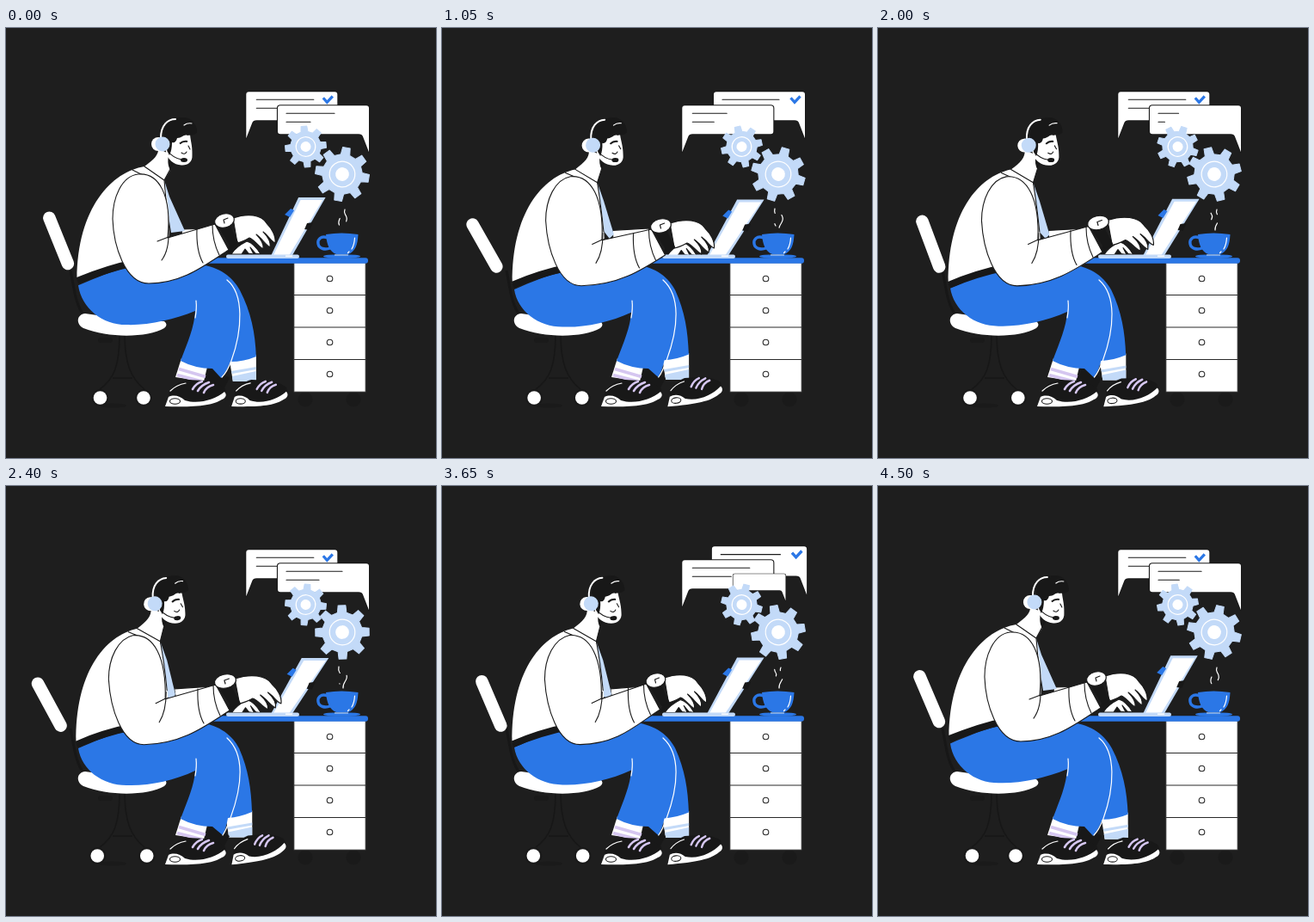
An HTML page for the animation above (4.55 s loop, 500 px wide and 500 px high).

```html
<!DOCTYPE html>
<html lang="en">
<head>
<meta charset="utf-8">
<title>Busy desk</title>
<style>
html, body { margin: 0; width: 100%; height: 100%; overflow: hidden; background: #1e1e1e; }
svg { display: block; width: 100vw; height: 100vh; }
.w { fill: #fff; }
.b { fill: #2b77e6; }
.l { fill: #c3daf8; }
.k { fill: #181818; }
.d { fill: #1a1a1a; }
.o { stroke: #1a1a1a; stroke-width: 1.1; stroke-linejoin: round; stroke-linecap: round; }
.n { fill: none; }
.out { paint-order: stroke; stroke-width: 2.2; }
.ws { fill: none; stroke: #fff; stroke-width: 1.2; stroke-linecap: round; }
.ds { fill: none; stroke: #171717; stroke-width: 1.6; }
</style>
</head>
<body>
<svg viewBox="0 0 500 500">
  <defs>
    <g id="shoe">
      <path class="k" d="M189,426 C193,415 202,411 210,409 L232,410 C238,411 247,413 254,418 Q257,424 253,428 L230,437 L204,436Z"/>
      <path class="w" d="M185,440 L189,429 C195,426 203,428 208,433 C224,438 243,432 254,423 C257,426 256,430 251,432 C240,439 222,441 185,440Z"/>
      <ellipse class="o n" cx="196.500" cy="434" rx="6" ry="3.200"/>
      <path class="ws" d="M191,422 Q198,415 209,413"/>
      <path d="M217,420 Q221,413 228,411 M223,422 Q227,415 236,412 M230,424 Q233,417 241,415" fill="none" stroke="#d5c6f0" stroke-width="2.600" stroke-linecap="round"/>
    </g>
  </defs>

  <g id="cards"></g>
  <g id="gearS"></g>
  <g id="gearL"></g>

  <!-- desk -->
  <circle class="d" cx="348" cy="432" r="8.500"/>
  <circle class="d" cx="404" cy="432" r="8.500"/>
  <rect class="w" x="335" y="273" width="83" height="150" stroke="#555" stroke-width=".8"/>
  <g id="drawers" fill="none" stroke="#2a2a2a" stroke-width="1.100"></g>
  <rect class="b" x="232" y="267.300" width="189" height="6.400" rx="3"/>

  <!-- cup -->
  <ellipse class="b" cx="390.500" cy="265.500" rx="21.500" ry="2.300"/>
  <path d="M374,244 C366,241 362,246 363,251 C364,257 371,258 377,256" fill="none" stroke="#2b77e6" stroke-width="3.400"/>
  <path class="b" d="M372,240 Q390,237 409.500,240 C409,252 406,260 398,263 H384 C376,260 373,252 372,240Z"/>
  <path class="ws" d="M405.500,244 Q405,252 402,257 M399,260 L397.500,261.500"/>
  <path d="M382,264 H398" stroke="#c3daf8" stroke-width="1.100"/>
  <path class="ws" id="steamL" d="M388,230 C384,224 391,221 388,217 Q386,214 387,210"/>
  <path class="ws" id="steamR" d="M392,235 C391,228 398,226 396,220 C395,216 392,216 394,211"/>

  <!-- laptop -->
  <path class="l" id="lid"/>
  <path class="w" id="screen"/>
  <g id="stickers">
    <path class="b" d="M324,217 L331,210 L335,212 L330,220Z"/>
    <path class="k" d="M347,234 L350,227 L357,226 L353,235Z"/>
  </g>

  <!-- chair -->
  <g class="ds">
    <path d="M75,282 C79,300 80,322 92,336" stroke-width="3"/>
    <path d="M132,356 C132,392 126,408 109,420 M138,356 C138,392 146,408 161,420 M124,407 H147"/>
  </g>
  <rect class="d" x="107" y="360" width="17" height="6" rx="3"/>
  <ellipse class="d" cx="124" cy="439" rx="16" ry="2.500"/>
  <g id="casters"></g>
  <path id="back" stroke="#fff" stroke-width="14.500" stroke-linecap="round"/>
  <path class="w" d="M92,332 C120,336 150,341 184,341 Q189,345 184,349 C165,360 120,361 90,349 C81,344 82,333 92,332Z"/>

  <!-- legs -->
  <g id="sockFar">
    <path class="w" d="M260,386 L291,380 L291,411 L264,411Z"/>
    <path class="l" d="M262,399 L291,394 V397 L263,402Z M263,405 L291,399 V411 H264Z"/>
  </g>
  <use href="#shoe" id="shoeFar"/>
  <path class="k" d="M230,410 L234,398 L240,394 C247,400 255,404 260,407 L253,420Z"/>
  <path class="w" d="M204,384 L234,394 L230,411 L197,406Z"/>
  <path d="M201,396.500 L232,405.500 M199,403.500 L228,411" fill="none" stroke="#d5c6f0" stroke-width="3.600"/>
  <use href="#shoe"/>
  <path class="b" id="pants"/>
  <path class="ws" id="seam"/>
  <path class="ws" d="M221,317 Q222,326 220,337"/>

  <!-- far arm -->
  <path class="w o" id="sleeveFar"/>
  <g id="handFar">
    <path class="k" d="M256,262 L262,248 L286,250 L297,263Z"/>
    <path class="w o" d="M262,263 C266,256 274,251 280,248 C287,250 292,256 296,263 L290,262 L284,255 L288,263 L282,262 L278,257 L274,263Z"/>
  </g>
  <rect class="l" x="256" y="263.500" width="85" height="4.500" rx="2.200"/>
  <rect class="w" x="325" y="264.500" width="8" height="1.500"/>

  <!-- torso -->
  <path class="l" id="tie"/>
  <path class="w" id="torso"/>
  <path id="belt" fill="none" stroke="#181818" stroke-width="8"/>
  <path class="w" id="neck"/>
  <path class="k" id="shade"/>
  <path class="o n" id="collar"/>

  <g id="head">
    <path class="w" d="M184,124 L214,122 C214,130 217,136 216.500,148 C217,156 211,160 204,159.500 C195,159 188,153 186,144Z"/>
    <path class="k" d="M184,128 C181,112 194,103 206,104 C215,103 223,112 222,122 C218,126 213,124 211,125 C207,123 205,128 199,128 C198,132 196,134 193,133 C193,139 192,144 190,148 C187,143 185,136 184,128Z"/>
    <path d="M202,134.500 Q206,131 211,132" fill="none" stroke="#1a1a1a" stroke-width="2"/>
    <path class="o n" d="M204,145 Q208,148 210,144 M212,137 L214,141"/>
    <path class="ws" d="M207,113 Q211,110 216,111"/>
    <path class="ws" d="M180,128 C180,113 188,106 197,106" style="stroke-width:2"/>
    <circle class="w" cx="177" cy="135" r="8"/>
    <circle class="l" cx="182" cy="135" r="8.500"/>
    <path class="o n" d="M188,143 Q194,151 204,153"/>
    <ellipse class="k" cx="207" cy="153.500" rx="4" ry="2.500"/>
  </g>

  <!-- near arm -->
  <path class="w o" id="arm"/>
  <path class="o n" id="crease"/>
  <g id="hand">
    <path class="w o" d="M264,221 C281,215 297,217 303,227 C309,233 314,242 313,250 C308,248 305,241 299,237 C305,243 308,250 307,255 C301,251 297,244 291,240 C297,246 300,252 299,257 C292,253 289,246 283,244 C278,247 274,249 269,250Z"/>
    <path class="k" d="M248,233 L260,229 L270,249 L261,254Z"/>
    <ellipse class="w o" cx="254" cy="224" rx="11.500" ry="8" transform="rotate(-14 254 224)"/>
    <path class="o n" d="M258,221 L253,223 L254,227"/>
  </g>
</svg>

<script>
const LOOP = 4550, CHAT = LOOP / 2, SWAY = LOOP / 3;
const $ = id => document.getElementById(id);
const put = (id, name, value) => $(id).setAttribute(name, value);

// blend the numbers of two paths of equal structure
function mix(a, b, k) {
  const to = b.match(/-?[\d.]+/g);
  let i = 0;
  return a.replace(/-?[\d.]+/g, n => (+n + (to[i++] - n) * k).toFixed(2));
}

// piecewise interpolation through [time, value, time, value, ...]
function keys(t, list, soft) {
  const n = list.length;
  if (t <= list[0]) return list[1];
  for (let i = 2; i < n; i += 2) {
    if (t <= list[i]) {
      let k = (t - list[i - 2]) / (list[i] - list[i - 2]);
      if (soft) k = (1 - Math.cos(Math.PI * k)) / 2;
      return list[i - 1] + (list[i + 1] - list[i - 1]) * k;
    }
  }
  return list[n - 1];
}

function gear(r) {
  const pts = [];
  for (let i = 0; i < 8; i++) {
    for (const [a, q] of [[-13, .74], [-8, 1], [8, 1], [13, .74]]) {
      const w = (i * 45 + a - 90) * Math.PI / 180;
      pts.push((Math.cos(w) * r * q).toFixed(2) + ',' + (Math.sin(w) * r * q).toFixed(2));
    }
  }
  return `<polygon class="l" points="${pts.join(' ')}" stroke="#c3daf8" stroke-linejoin="round"/>
    <circle class="ws" r="${r * .47}"/><circle class="w" r="${r * .25}"/>`;
}

$('gearL').innerHTML = gear(31.5);
$('gearS').innerHTML = gear(24);
$('drawers').innerHTML = [0, 1, 2, 3].map(i => {
  const y = 273 + i * 37.5;
  return (i ? `<path d="M335,${y} H418"/>` : '') +
    `<circle cx="376.500" cy="${291.5 + i * 37}" r="3.300"/>`;
}).join('');

function card(left, y, size, line1, line2, tick) {
  if (size <= 0) return '';
  const x = left ? -41 : -43;
  return `<g transform="translate(${left ? 332.3 : 369} ${y}) scale(${size})">
    <path class="w o out" transform="scale(${left ? 1 : -1} 1)" d="M-50,0 H50 Q53,0 53,3 V30 Q53,33 50,33 H-41 Q-45,33 -46,36 L-53,54 V3 Q-53,0 -50,0Z"/>
    <path class="o n" d="${line1 > 0 ? `M${x},9 h${line1}` : ''}${line2 > 0 ? `M${x},19 h${line2}` : ''}"/>
    ${tick > 0 ? `<path d="M-5.500,-2 L-1,3 L5.500,-4" transform="translate(42 9) scale(${tick})" fill="none" stroke="#2b77e6" stroke-width="3.200"/>` : ''}
  </g>`;
}

function drawCards(t) {
  const c = t % CHAT, left = c < 1200, u = left ? c : c - 1100;
  const up = 16 * keys(u, [125, 0, 275, .25, 500, .63, 625, .94, 700, 1]);
  const die = keys(u, [200, 1, 275, 1.04, 400, 1.05, 500, .925, 625, .29, 680, 0]);
  const pop = left ? keys(c, [380, 0, 500, .8, 625, 1.075, 750, 1])
                   : keys(c, [1290, 0, 1375, .575, 1500, 1.05, 1600, 1.1, 1750, 1]);
  const tick = keys(u, [350, 0, 500, .75, 600, 1]);
  const v = left ? c + CHAT : c;
  const typed = {
    true: [keys(c, [750, 0, 1250, 66.5]), keys(c, [800, 0, 1250, 45])],
    false: [keys(v, [1800, 0, 2275, 56, 2400, 65, 2430, 66]),
            keys(v, [1900, 0, 2275, 28, 2400, 38, 2480, 44])]
  };
  $('cards').innerHTML =
    card(left, 74.3 - up, die, 66.5, 45, 1) +
    card(!left, 90.3 - up, 1, ...typed[!left], tick) +
    card(left, 106.3 - up, pop, ...typed[left], 0);
}

function drawBody(t) {
  const ph = t / SWAY % 1, turn = 2 * Math.PI;
  const p = (1 - Math.cos(turn * ph)) / 2;
  const q = (1 - Math.cos(turn * (ph - .05))) / 2;
  const c = Math.cos(turn * (ph - .17));
  const wx = keys(t, [0, 254, 500, 252, 1600, 257, 2400, 255, 2900, 252, 3650, 248.5, 4500, 254], true);
  const wy = keys(t, [0, 224, 500, 234, 1600, 226, 2400, 227, 2900, 227, 3650, 226, 4500, 224], true);
  const reach = keys(t, [0, 0, 500, .2, 1600, .8, 2400, 1, 2900, 0], true);
  const morph = (id, a, b, k = p) => put(id, 'd', mix(a, b, k));

  // chair
  put('back', 'd', `M${45.5 + 10 * c},${221 + 6 * p - 2.5 * (c - .4)} L${69.5 + 5 * c - 1.8 * p},${274 + 5 * p}`);
  $('casters').innerHTML = [109.5 - 3.5 * p, 160 + 4 * p].map(x =>
    `<circle class="d" cx="${x}" cy="430" r="10"/><circle class="w" cx="${x}" cy="430" r="7.800"/>`).join('');

  // legs
  put('shoeFar', 'transform', `rotate(${-7.5 * q} 264 438) translate(91 0) scale(.925 1)`);
  put('sockFar', 'transform', `translate(${-4.8 * q} ${-2.5 * q})`);
  morph('pants',
    'M84,299 C105,290 125,282 142,278 L225,275 C249,278 264,290 272,305 C285,330 290,355 291,382 Q277,388 261,388 Q257,399 250,407 L240,396 Q220,396 203,387 C211,366 219,348 220,329 C195,339 165,346 140,345 C112,345 88,326 84,299Z',
    'M84,305 C105,296 120,289 142,285 L225,275 C249,278 264,291 271,305 C282,330 285,352 286,379 Q272,385 258,386 Q256,398 252,406 L240,396 Q220,396 203,387 C211,366 219,348 220,331 C195,343 165,349 140,348 C112,348 88,330 84,305Z', q);
  morph('seam', 'M257,293 C277,309 275,351 262,387 Q257,400 251,406',
    'M257,293 C278,312 275,348 261,386 Q256,400 252,406', q);

  // laptop lid
  const sx = 3.8 * q, sy = 3 * q;
  put('lid', 'd', `M308,265 L${340 + sx},${197 + sy} H${371.5 + sx} L332,266Z`);
  put('screen', 'd', `M311,264 L${342.5 + sx},${200 + sy} H${368 + sx} L329.5,264Z`);
  put('stickers', 'transform', `translate(${sx * .7} ${sy * .6})`);

  // torso
  morph('torso',
    'M161,161 C123,167 83,209 82.500,292 Q110,280 150,272 L190,242 C191,222 188,200 184,177Z',
    'M152,166 C113,175 80,219 81.500,299 Q110,286 150,279 L188,246 C187,224 182,204 179,181Z');
  morph('belt', 'M83,294 C100,287 120,279 150,273', 'M82,301 C100,293 120,286 150,280');
  morph('tie', 'M184,177 L190,196 L208,236 L192,238 L187,205Z', 'M179,181 L187,203 L196,242 L196,248 L186,248Z');
  morph('neck',
    'M161,161 C172,153 178,147 177,140 L193,148 C188,158 190,161 191,165 L184,177Z',
    'M152,166 C163,158 169,152 168,142 L185,150 C181,157 182,160 183,164 L179,181Z');
  morph('shade', 'M189,148 L197,157 C193,159 193,162 191,165 C188,160 188,154 189,148Z',
    'M181,150 L188,157 C185,158 184,161 183,164 C181,160 180,156 181,150Z');
  morph('collar', 'M161,161 L184,177 L191,164 M147,165 L159,171 M184,177 Q186,205 190,235',
    'M152,166 L179,181 L183,164 M142,170 L152,174 M179,181 Q184,205 187,238');
  put('head', 'transform', `translate(${-9.5 * p} ${2 * p}) rotate(${-4 * p} 181 135)`);

  // arms
  put('sleeveFar', 'd', `M${205 - 10 * p},${234 + 2 * p} L${wx - 14},233 L${wx},262 L200,262Z`);
  put('handFar', 'transform', `translate(${(wx - 254) * .5} ${(224 - wy) * -.25})`);
  const at = (x, y) => `${(wx + x).toFixed(2)},${(wy + y).toFixed(2)}`;
  const shoulder = mix('M188,244 C193,195 178,168 154,170 C134,172 124,198 124,222 C125,252 138,297 166,297',
    'M185,248 C186,200 172,172 147,174 C130,178 119,200 119,225 C121,258 134,301 160,301', p);
  put('arm', 'd', `${shoulder} C205,${297 + 3 * p} ${at(-23, 52)} ${at(5, 34)} L${at(-11, 4)} Z`);
  const fold = mix('M189,235 Q190,258 181,270 M189,243 L176,248', 'M186,240 Q186,262 178,275 M186,247 L174,253', p);
  put('crease', 'd', `${fold} M${at(-32, 9)} Q${at(-33, 35)} ${at(-25, 49)} M${at(-14, 5)} Q${at(-14, 24)} ${at(-6, 40)}`);
  put('hand', 'transform', `translate(${wx} ${wy}) scale(${1 + .1 * reach} 1) translate(-254 -224)`);

  // steam
  put('steamL', 'stroke-dasharray', '8 13');
  put('steamL', 'stroke-dashoffset', -1 - 21 * ph);
  put('steamR', 'stroke-dasharray', '16 11');
  put('steamR', 'stroke-dashoffset', 16 - 27 * ph);
}

function draw(t) {
  const a = t / LOOP * 360;
  put('gearL', 'transform', `translate(391 170) rotate(${9 - a})`);
  put('gearS', 'transform', `translate(348.500 138) rotate(${a - 5})`);
  drawCards(t);
  drawBody(t);
}

const start = performance.now();
function tick() {
  const t = (performance.now() - start) % LOOP;
  draw(Math.floor(t / 50) * 50);
  requestAnimationFrame(tick);
}
tick();
</script>
</body>
</html>
```
